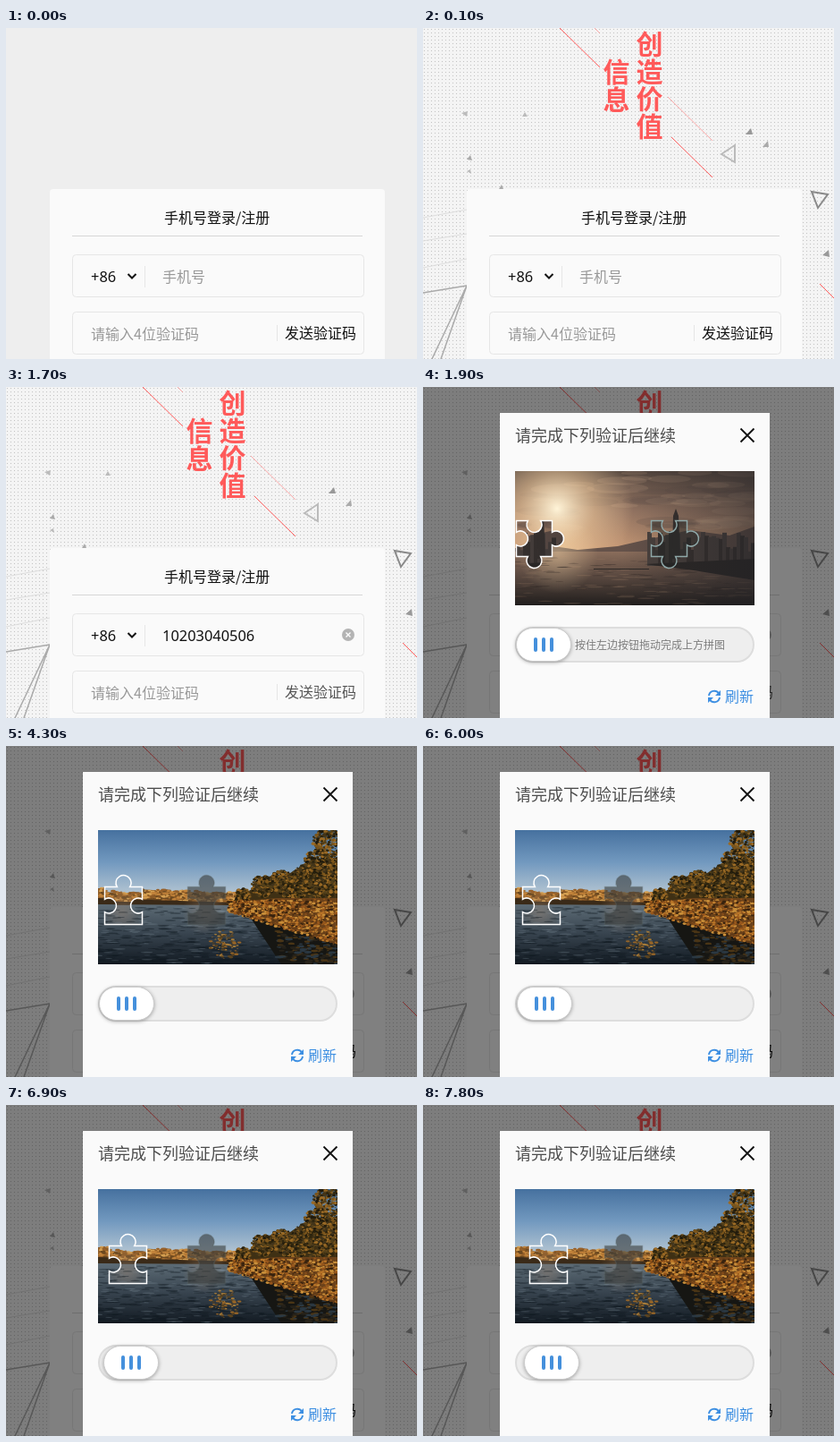
Animation, 460 px wide and 370 px high, one loop 8000 ms. Source, as an HTML page with a canvas:

```html
<!DOCTYPE html>
<html lang="zh-CN">
<head>
<meta charset="utf-8">
<title>滑动验证</title>
<style>
html, body { margin: 0; width: 100%; height: 100%; overflow: hidden; background: #eee; }
svg, canvas { position: absolute; left: 0; top: 0; }
canvas { left: 103px; top: 94px; }
text { font: 16px "Noto Sans CJK SC", "Noto Sans CJK", sans-serif; fill: #111; }
.num { font: 16.4px "Noto Sans", sans-serif; }
.hint { fill: #999; }
.line { fill: none; stroke: #e6e6e6; }
.slogan text { font-size: 30px; font-weight: 900; fill: #ff5a5a; text-anchor: middle; }
.slogan path { stroke: #ff5a5a; fill: none; }
#handle rect:first-child { fill: #fff; stroke: #ccc; filter: drop-shadow(0 1px 2px #0005); }
.bar { fill: #4590dc; }
</style>
</head>
<body>
<svg id="stage" width="460" height="370" viewBox="0 0 460 370">
  <defs>
    <pattern id="dots" width="4" height="4" patternUnits="userSpaceOnUse">
      <rect width="4" height="4" fill="#f4f4f4"/><rect x="1" y="1" width="1" height="1" fill="#c2c2c2"/>
    </pattern>
  </defs>
  <rect width="460" height="370" fill="#eee"/>
  <g id="backdrop">
    <rect width="460" height="370" fill="url(#dots)"/>
    <path d="M0 212L49 203M0 238L49 230M0 268L49 258" stroke="#ddd"/>
    <path d="M0 296L49 288L10 370M49 288L20 370" fill="none" stroke="#aaa" stroke-width="1.5"/>
    <path d="M334 141L349 131V150Z" fill="none" stroke="#bbb" stroke-width="2"/>
    <path d="M435 183L453 186L442 201Z" fill="none" stroke="#8a8a8a" stroke-width="2"/>
    <path d="M361 119L367 112L369 119ZM447 254L454 248L455 256Z" fill="#999"/>
    <path d="M380 133L386 126L387 133ZM49 147L53 142L55 148ZM85 180L88 175L90 180Z" fill="#aaa"/>
    <path d="M111 99L114 94L117 99ZM43 95L50 93L49 99ZM49 160L53 158L54 163Z" fill="#bbb"/>
    <g class="slogan">
      <path d="M153 0L198 44M278 122L324 167M444 286L460 302"/>
      <path d="M192 0L198 6M274 77L324 126" opacity=".5"/>
      <text x="253.5" y="29">创</text><text x="253.5" y="60">造</text>
      <text x="253.5" y="90">价</text><text x="253.5" y="121">值</text>
      <text x="216.5" y="60">信</text><text x="216.5" y="91">息</text>
    </g>
  </g>

  <g id="card">
    <rect x="49" y="180" width="375" height="200" rx="4" fill="#fafafa"/>
    <text x="177" y="218">手机号登录/注册</text>
    <path class="line" d="M74 232.5H399" style="stroke:#d6d6d6"/>
    <rect class="line" x="74.5" y="253.5" width="326" height="47" rx="4"/>
    <rect class="line" x="74.5" y="317.5" width="326" height="47" rx="4"/>
    <path class="line" d="M155.5 266V290M303.5 332V350"/>
    <text class="num" x="95" y="284">+86</text>
    <path d="M136.5 275L141 279.5L145.5 275" fill="none" stroke="#111" stroke-width="2"/>
    <text id="phoneHint" class="hint" x="175" y="284">手机号</text>
    <g id="phone">
      <text class="num" x="175" y="284">10203040506</text>
      <circle cx="383" cy="277" r="7" fill="#b4b4b4"/>
      <path d="M380.5 274.5l5 5m0-5l-5 5" stroke="#fff" stroke-width="1.3"/>
    </g>
    <rect id="caret" x="278" y="267" width="1" height="21" fill="#111"/>
    <text class="hint" x="95" y="348">请输入4位验证码</text>
    <text id="send" x="312" y="347">发送验证码</text>
  </g>

  <rect id="shade" width="460" height="370" fill="#000" opacity=".49"/>

  <g id="dialog">
    <rect x="86" y="29" width="302" height="341" fill="#fafafa"/>
    <text x="103" y="61" style="font-size:18px;fill:#4c4c4c">请完成下列验证后继续</text>
    <path d="M355.5 46.5l15 15m0-15l-15 15" stroke="#111" stroke-width="1.8"/>
    <rect x="104" y="269" width="266" height="38" rx="19" fill="#eee" stroke="#ddd" stroke-width="2"/>
    <text id="dragHint" x="170" y="293" style="font-size:12px;fill:#7c7c7c">按住左边按钮拖动完成上方拼图</text>
    <g id="handle">
      <rect x="104.5" y="269.5" width="61" height="37" rx="18.5"/>
      <rect class="bar" x="124" y="280" width="4" height="16" rx="2"/>
      <rect class="bar" x="133" y="280" width="4" height="16" rx="2"/>
      <rect class="bar" x="142" y="280" width="4" height="16" rx="2"/>
    </g>
    <path d="M320 345A6 6 0 0 1 331 342.5M332 347A6 6 0 0 1 321 349.5" fill="none" stroke="#3d8fe2" stroke-width="2"/>
    <path d="M333 339V345H327ZM319 353V347H325Z" fill="#3d8fe2"/>
    <text x="338" y="352" style="fill:#3d8fe2">刷新</text>
  </g>
</svg>
<canvas id="puzzle" width="268" height="150"></canvas>

<script>
const W = 268, H = 150, LOOP = 8000;
const $ = id => document.getElementById(id);
const show = (id, on) => { $(id).style.display = on ? '' : 'none'; };
const ctx = $('puzzle').getContext('2d');

let seed = 7;
const rnd = () => (seed = (seed * 16807) % 2147483647) / 2147483647;

function makePhoto(paint) {
  const c = document.createElement('canvas');
  c.width = W; c.height = H;
  paint(c.getContext('2d'));
  return c;
}
function fade(g, y0, y1, ...colors) {
  const grad = g.createLinearGradient(0, y0, 0, y1);
  colors.forEach((c, i) => grad.addColorStop(i / (colors.length - 1), c));
  g.fillStyle = grad;
  g.fillRect(0, y0, W, y1 - y0);
}
function glow(g, x, y, r, ...colors) {
  const grad = g.createRadialGradient(x, y, 0, x, y, r);
  colors.forEach((c, i) => grad.addColorStop(i / (colors.length - 1), c));
  g.fillStyle = grad;
  g.fillRect(0, 0, W, H);
}
function polygon(g, color, ...points) {
  g.fillStyle = color;
  g.beginPath();
  points.forEach(p => g.lineTo(...p));
  g.fill();
}
function dabs(g, count, colors, rx, ry, place) {
  for (let i = 0; i < count; i++) {
    const [x, y] = place(rnd(), rnd()), k = .5 + rnd();
    g.fillStyle = colors[Math.floor(rnd() * colors.length)];
    g.beginPath();
    g.ellipse(x, y, rx * k, ry * k, 0, 0, 7);
    g.fill();
  }
}
const inDisc = (cx, cy, r) => (u, v) =>
  [cx + r * Math.sqrt(u) * Math.cos(v * 6.283), cy + r * Math.sqrt(u) * Math.sin(v * 6.283)];

const harbour = makePhoto(g => {
  fade(g, 0, 90, '#55473f', '#967663', '#c99a76');
  dabs(g, 60, ['#5a4b4630', '#d8b09028'], 24, 4, (u, v) => [u * W, v * 65]);
  glow(g, 47, 42, 85, '#fff4d8', '#f6d0a080', '#f6d0a000');
  polygon(g, '#65524a', [0, 86], [30, 82], [70, 88], [115, 84], [150, 76], [195, 66], [240, 72], [W, 62], [W, 96], [0, 92]);
  fade(g, 90, H, '#8a6d5b', '#55453d', '#211e1d');
  glow(g, 48, 92, 45, '#ffe0b070', '#ffe0b000');
  dabs(g, 180, ['#30272560', '#c0987830'], 7, .5, (u, v) => [u * W, 94 + v * 56]);
  for (let x = 148; x < W; x += 4) {
    const h = 8 + rnd() * 24;
    g.fillStyle = rnd() < .5 ? '#39322f' : '#4b423e';
    g.fillRect(x, 98 - h, 5, h + 8);
  }
  polygon(g, '#39322f', [176, 98], [177, 50], [180, 42], [183, 50], [185, 98]);
  polygon(g, '#2c2826', [145, 104], [W, 98], [W, 122], [200, 111]);
  g.fillRect(88, 109, 62, 1);
  const side = g.createLinearGradient(120, 0, W, 0);
  side.addColorStop(0, '#20202400');
  side.addColorStop(1, '#20202490');
  g.fillStyle = side;
  g.fillRect(0, 0, W, H);
});

const river = makePhoto(g => {
  fade(g, 0, 72, '#46719f', '#7299bf', '#b4c5d2');
  polygon(g, '#8a5a26', [0, 65], [45, 66], [95, 69], [150, 71], [150, 84], [0, 80]);
  dabs(g, 450, ['#c1823a', '#96602a', '#6b4820', '#d6a052'], 2.2, 1,
    (u, v) => [u * 160, 64 + u * 6 + v * (13 - u * 2)]);
  fade(g, 81, H, '#5f6e78', '#38444f', '#121a22');
  polygon(g, '#3a2a18', [0, 76], [150, 81], [150, 84], [0, 83]);
  glow(g, 120, 92, 26, '#a08a7870', '#a08a7800');
  dabs(g, 500, ['#8997a240', '#0e161e70', '#0e161e70'], 5, .6, (u, v) => [u * 235, 86 + v * 64]);
  polygon(g, '#161613', [170, 97], [W, 118], [W, H], [205, H]);
  dabs(g, 160, ['#4a3516', '#26221a', '#2b3842'], 3, 1, (u, v) => [200 + u * 68, 112 + u * 14 + v * 30]);

  const leaves = ['#54401a', '#7c561c', '#2f260f', '#9a6a26', '#42341a', '#211b0d'];
  polygon(g, '#3f3014', [150, 80], [172, 66], [190, 52], [215, 48], [235, 36], [W, 30], [W, 90], [160, 90]);
  for (const [x, y, r] of [[257, 14, 17], [246, 36, 15], [261, 42, 16], [232, 54, 15], [250, 62, 18],
    [206, 58, 13], [184, 63, 12], [162, 73, 8], [220, 68, 13]])
    dabs(g, r * 18, leaves, 1.5, 1.2, inDisc(x, y, r));

  polygon(g, '#6c421a', [145, 81], [200, 76], [W, 76], [W, 128], [225, 113], [170, 97]);
  dabs(g, 1300, ['#b87428', '#96561c', '#633c18', '#38230f', '#c98f3a'], 1.6, 1,
    (u, v) => [146 + u * 122, 79 - u * 2 + v * (12 + u * 40)]);
  dabs(g, 90, ['#946428', '#5a4320', '#a67c3a'], 1.7, .8, inDisc(142, 128, 17));
});

// Each side of the outline: 1 is a tab, -1 a notch, 0 straight.
function outline(x, y, size, sides) {
  const r = 8.5, d = 4.5, a = Math.asin(d / r);
  ctx.save();
  ctx.translate(x, y);
  ctx.beginPath();
  for (const side of sides) {
    ctx.lineTo(0, 0);
    if (side) ctx.arc(size / 2, -side * d, r, Math.PI - side * a, side * a, side < 0);
    ctx.translate(size, 0);
    ctx.rotate(Math.PI / 2);
  }
  ctx.closePath();
  ctx.restore();
}

const puzzles = {
  harbour: { photo: harbour, x: 1.5, y: 55.5, gap: 151, size: 40, sides: [-1, 1, 1, -1], fill: '#20252570', edge: '#8fa8a8' },
  river: { photo: river, x: 7.5, y: 63.5, gap: 93, size: 42, sides: [1, -1, 0, -1], fill: '#383c3c98', edge: '#55606060' }
};
function drawPuzzle({ photo, x, y, gap, size, sides, fill, edge }, shift) {
  ctx.drawImage(photo, 0, 0);
  outline(x + gap, y, size, sides);
  ctx.fillStyle = fill;
  ctx.fill();
  ctx.lineWidth = 1.5;
  ctx.strokeStyle = edge;
  ctx.stroke();
  ctx.save();
  outline(x + shift, y, size, sides);
  ctx.clip();
  ctx.drawImage(photo, shift - gap, 0);
  ctx.restore();
  ctx.strokeStyle = '#fff';
  ctx.stroke();
}

const dragTimes = [6000, 6200, 6400, 6700, 6900, 7100, 7400, 7600, 7800];

function render(now) {
  const t = now % LOOP, open = t >= 1900, typed = t >= 1400;
  const shift = dragTimes.filter(time => t >= time).length;
  show('backdrop', t >= 100);
  show('phoneHint', !typed);
  show('phone', typed);
  show('caret', typed && t < 1700);
  show('shade', open);
  show('dialog', open);
  show('puzzle', open);
  show('dragHint', t < 4300);
  $('send').style.fill = t >= 1500 && t < 2000 ? '#555' : '#111';
  $('handle').setAttribute('transform', `translate(${shift})`);
  if (open) drawPuzzle(t < 2000 ? puzzles.harbour : puzzles.river, shift);
  requestAnimationFrame(render);
}
render(performance.now());
</script>
</body>
</html>
```
